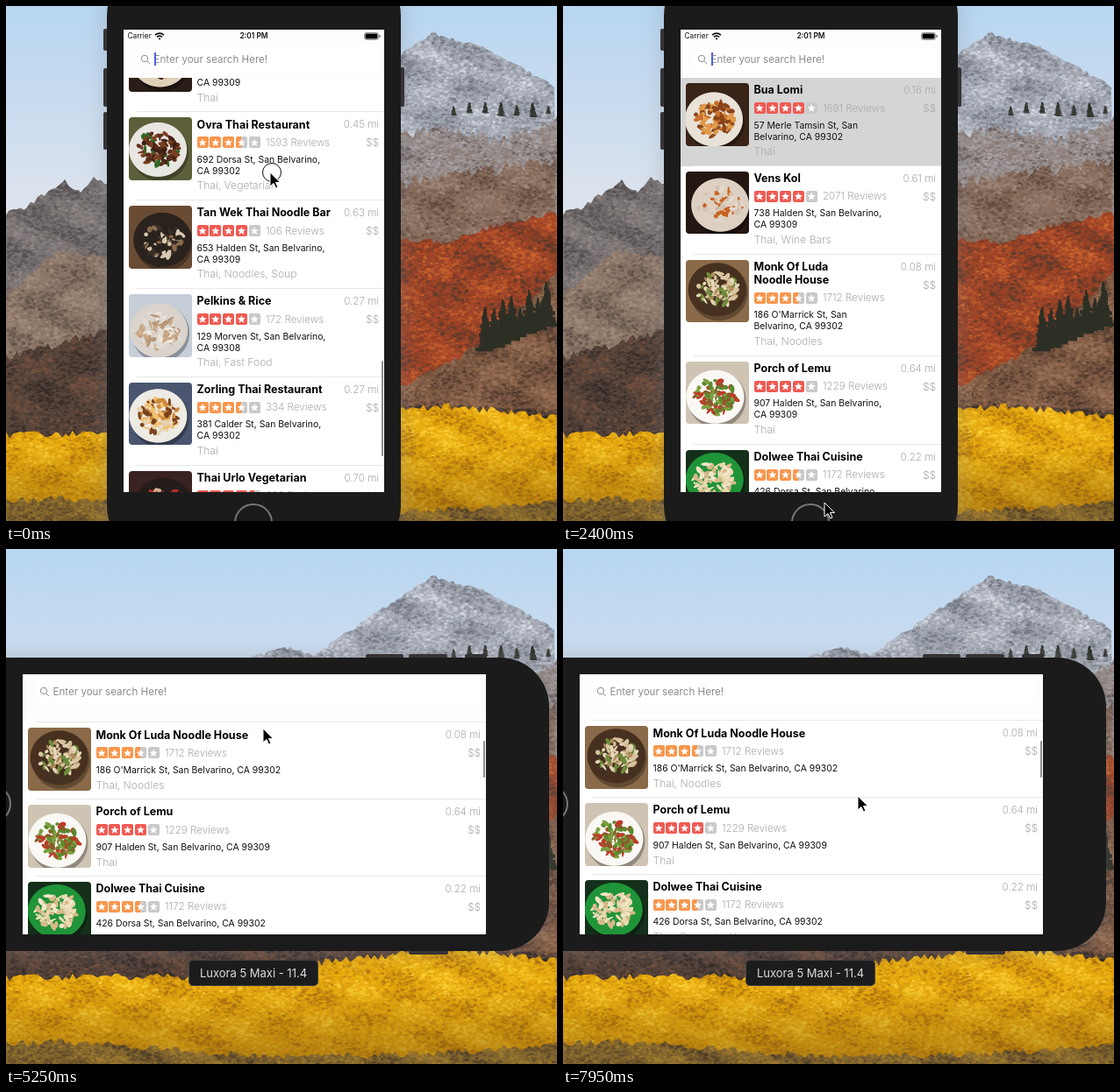
Write an HTML page with a canvas that moves like this. It is 628 by 588 pixels and loops after 8 s.

```html
<!DOCTYPE html>
<html lang="en">
<head>
<meta charset="utf-8">
<title>Restaurant list</title>
<style>
html, body { margin: 0; width: 100%; height: 100%; overflow: hidden; background: #c9dcf0; }
#stage { position: relative; width: 628px; height: 588px; overflow: hidden; font-family: Inter, Roboto, sans-serif; }
#stage div, #stage canvas, #stage svg { position: absolute; }
#device { left: 134px; top: 27px; width: 297px; height: 528px; }
#body { left: -19px; top: -72px; width: 335px; height: 672px; border-radius: 56px; background: #1b1b1b; box-shadow: 0 0 24px rgba(120,130,140,.35); }
.btn { width: 5px; background: #2b2627; border-radius: 2px; }
#home { left: 126px; top: 541px; width: 40px; height: 40px; border: 2px solid #777; border-radius: 50%; }
#shade { left: 5px; top: 528px; width: 292px; height: 23px; background: #0f0f0f; }
#screen { left: 0; top: 0; width: 297px; height: 528px; overflow: hidden; }
#view { left: 0; top: 0; }
#page { left: 0; top: 0; width: 100%; height: 100%; overflow: hidden; background: #fff; }
#list { left: 0; width: 100%; }
.row { left: 0; width: 100%; background: #fff; }
.row.on { background: #d5d5d5; }
.pic { left: 6px; top: 6px; width: 71.5px; height: 71.5px; border-radius: 4px; }
.row div { white-space: pre; }
.name { left: 83.5px; top: 6.2px; font: 700 12.5px/15.5px Inter, Roboto, sans-serif; color: #000; overflow: hidden; }
.grey { font-size: 11.6px; line-height: 16px; color: #aaa; font-weight: 300; }
.kinds { left: 83.5px; font-size: 12.1px; }
.addr { left: 83.5px; font-size: 10.4px; line-height: 13px; color: #111; }
.star { top: 0; width: 13px; height: 13px; border-radius: 2px; }
.star::after { content: ""; position: absolute; inset: 2px; background: #fff;
  clip-path: polygon(50% 0, 64% 34%, 100% 37%, 73% 60%, 82% 97%, 50% 77%, 18% 97%, 27% 60%, 0 37%, 36% 34%); }
.line { left: 15px; right: 0; bottom: 0; height: 1px; background: #e8e8ea; }
#head { left: 0; top: 0; width: 100%; background: #fdfdfd; }
#field { left: 14px; right: 6px; height: 26px; border-radius: 6px; background: #fff; }
#field svg { left: 5px; top: 7px; }
#hint { left: 20.5px; top: 5px; font-size: 11.6px; line-height: 16px; color: #8b8b8f; white-space: pre; }
#caret { left: 21px; top: 5px; width: 1.5px; height: 15px; background: #4a62d8; }
#status { left: 0; top: 0; width: 100%; height: 16px; font-size: 8.4px; line-height: 15px; color: #111; }
#bar { right: 1px; width: 2.5px; border-radius: 2px; background: #8c8c8c; }
#keys { left: 0; width: 100%; height: 150px; background: #cfd2d8; }
.key { width: 9%; height: 27px; background: #fff; border-radius: 4px; font-size: 14px; line-height: 27px; text-align: center; color: #111; box-shadow: 0 1px #999; }
#tag { left: 208px; top: 469px; width: 146px; height: 28px; border: 1px solid #444; border-radius: 5px; background: #1b1c1e; color: #ddd; font-size: 13px; line-height: 29px; text-align: center; white-space: pre; }
#ring { left: -9px; top: -11px; width: 20px; height: 20px; border: 1px solid #111; border-radius: 50%; }
#pointer { left: 0; top: 0; }
</style>
</head>
<body>
<div id="stage">
  <canvas id="wall" width="628" height="588"></canvas>
  <div id="device">
    <div id="body"></div>
    <div id="home"></div>
    <div id="shade"></div>
    <div id="screen"><div id="view">
      <div id="page">
        <div id="list"></div>
        <div id="bar"></div>
        <div id="head">
          <div id="field">
            <svg width="12" height="12" fill="none" stroke="#8b8b8f"><circle cx="5" cy="5" r="3.7"/><path d="M7.8 7.8 11 11"/></svg>
            <div id="hint">Enter your search Here!</div><div id="caret"></div>
          </div>
          <div id="status">
            <div style="left:4.5px">Carrier</div>
            <svg style="left:35px;top:3px" width="12" height="9" fill="none" stroke="#111" stroke-width="1.6"><path d="M1 3.2Q6-1 11 3.2M2.9 5.4Q6 2.8 9.1 5.4M5 7.4H7"/></svg>
            <div style="left:0;width:100%;text-align:center;font-weight:600">2:01 PM</div>
            <svg style="right:3px;top:3px" width="20" height="9"><rect x=".5" y=".5" width="16" height="8" rx="2" fill="none" stroke="#999"/><rect x="1.5" y="1.5" width="14" height="6" rx="1"/><path d="M18 3v3" stroke="#777" stroke-width="1.5"/></svg>
          </div>
        </div>
      </div>
      <div id="keys"></div>
    </div></div>
  </div>
  <div id="tag">Luxora 5 Maxi - 11.4</div>
  <div id="pointer">
    <div id="ring"></div>
    <svg style="left:-1px;top:-1px" width="15" height="21"><path transform="translate(1 1)" d="M0 0V16L4 12.5 6.5 18 9 17 6.5 11.5H11.5Z" stroke="#fff"/></svg>
  </div>
</div>
<script>
const $ = id => document.getElementById(id);
const mix = (a, b, p) => a + (b - a) * p;
const clamp = p => Math.max(0, Math.min(1, p));

let seed = 7;
const rnd = () => (seed = (seed * 16807) % 2147483647) / 2147483647;
const pick = list => list[Math.floor(rnd() * list.length)];

function add(parent, cls, text = "", style = {}) {
  const el = document.createElement("div");
  el.className = cls;
  el.textContent = text;
  Object.assign(el.style, style);
  parent.append(el);
  return el;
}

// ---------- wallpaper ----------
function paintWall() {
  const c = $("wall").getContext("2d");
  const W = 628, H = 588;
  const fade = (y0, y1, cols) => {
    const g = c.createLinearGradient(0, y0, 0, y1);
    cols.forEach((k, i) => g.addColorStop(i / (cols.length - 1), k));
    return g;
  };
  // Ground below a rough ridge line, grained from a dark-to-light palette
  const land = (ridge, rough, depth, tones, size = 2) => {
    const x0 = ridge[0][0], x1 = ridge[ridge.length - 1][0];
    const y0 = Math.min(...ridge.map(p => p[1]));
    c.save();
    c.beginPath();
    c.moveTo(x0, H);
    for (let i = 1; i < ridge.length; i++) {
      const [ax, ay] = ridge[i - 1], [bx, by] = ridge[i];
      for (let x = ax; x <= bx; x += 4) c.lineTo(x, mix(ay, by, (x - ax) / (bx - ax)) + (rnd() - .5) * rough);
    }
    c.lineTo(x1, H);
    c.clip();
    c.fillStyle = tones[tones.length >> 1];
    c.fillRect(x0, y0 - rough, x1 - x0, H);
    const n = (x1 - x0) * (depth + rough) / (size * size);
    for (let i = 0; i < n; i++) {
      const x = mix(x0, x1, rnd()), y = y0 - rough + (depth + rough) * rnd();
      const wave = Math.sin(x * .07 + 2 * Math.sin(y * .06)) + Math.sin(y * .13 - x * .05);
      const k = clamp(.5 + wave * .16 + (rnd() - .5) * .75);
      c.globalAlpha = .35 + rnd() * .4;
      c.fillStyle = tones[Math.min(tones.length - 1, Math.floor(k * tones.length))];
      const s = size * (.5 + rnd());
      c.fillRect(x, y, s * 1.6, s);
    }
    c.restore();
  };
  c.fillStyle = fade(0, 240, ["#b7d6f1", "#cbdcef", "#dfe4ec"]);
  c.fillRect(0, 0, W, H);

  land([[270,126], [320,113], [350,122], [430,68], [485,31], [545,47], [628,94]], 5, 130, ["#6d727e", "#8b909b", "#a3a8b2", "#bcc2cd", "#d8dde6"]);
  land([[440,150], [500,138], [560,155], [628,130]], 14, 150, ["#5f5352", "#857976", "#98908f", "#b2adb1", "#8a7468"]);
  land([[440,205], [530,190], [628,180]], 16, 90, ["#5c463c", "#77604f", "#8c7161", "#a08b80"]);
  land([[440,264], [500,270], [560,250], [628,236]], 8, 200, ["#4f3a2e", "#7c3a26", "#9c4428", "#b9502a", "#cf6a30"]);
  land([[440,440], [520,400], [560,372], [628,305]], 8, 190, ["#4c372c", "#6b4d3b", "#855f48", "#a0785c"]);
  land([[0,236], [20,231], [67,200], [85,214], [100,196], [300,290]], 5, 180, ["#524d50", "#686264", "#7b7474", "#968e8b"]);
  land([[0,330], [60,280], [300,300]], 8, 170, ["#5b4d45", "#7a685c", "#8f7a6b", "#a8917f"]);
  land([[0,402], [115,370], [330,420], [440,455], [628,462]], 10, 140, ["#2f2826", "#443732", "#5b473c", "#7c5540"]);
  land([[0,490], [220,488], [440,464], [500,456], [628,470]], 9, 132, ["#a86f12", "#cf920f", "#e6a90f", "#f2bb17", "#fbd23a"]);
  // The lower half of the foliage is darker
  c.fillStyle = fade(500, H, ["rgba(120,75,10,0)", "rgba(110,70,20,.45)"]);
  c.fillRect(0, 500, W, 88);
  land([[0,566], [60,562], [300,580], [480,577], [628,566]], 8, 30, ["#4d3c28", "#6b532c", "#86692f", "#a8822f"]);

  const tree = (x, y, h) => {
    c.fillStyle = "#2d2f25";
    for (let k = 0; k < 1; k += .07) {
      const w = h * .2 * (1 - k) + 1;
      c.fillRect(x - w * (.6 + rnd() * .6), y - h * k - h / 12, w * 2, h / 11);
    }
  };
  for (let i = 0; i < 8; i++) tree(546 + i * 10, 394 - i * 4, 30 + rnd() * 22);
  for (let i = 0; i < 7; i++) tree(510 + i * 18, 122 + rnd() * 6, 8 + rnd() * 9);
}

// ---------- dish pictures: table, plate, then food colours ----------
function dish(canvas, colours) {
  const [table, plate, ...food] = colours.split(" ").map(k => "#" + k);
  const c = canvas.getContext("2d");
  c.scale(2, 2);
  const oval = (col, x, y, a, b, turn) => {
    c.fillStyle = col;
    c.beginPath();
    c.ellipse(x, y, a, b, turn, 0, 7);
    c.fill();
  };
  c.fillStyle = table;
  c.fillRect(0, 0, 72, 72);
  const x = 32 + rnd() * 8, y = 34 + rnd() * 8, r = 33;
  oval("rgba(0,0,0,.3)", x + 2, y + 3, r, r, 0);
  oval(plate, x, y, r, r * .94, 0);
  for (let i = 0; i < 90; i++) {
    const a = rnd() * 7, d = Math.sqrt(rnd()) * r * .7;
    oval(pick(food), x + Math.cos(a) * d, y + Math.sin(a) * d * .85, 2 + rnd() * 4, 1 + rnd() * 2, rnd() * 3);
  }
}

// name, stars, reviews, address, kinds, miles, colours; "|" breaks the line on the narrow layout
const CITY = ", San Belvarino,|CA 99", WRAP = ", San|Belvarino, CA 99";
const rows = [
  ["Bua Lomi", 4, 1691, "57 Merle Tamsin St" + WRAP + "302", "Thai", "0.16", "3a2418 e8e2d8 c9702a e09a4a 8a4418"],
  ["Vens Kol", 4, 2071, "738 Halden St" + CITY + "309", "Thai, Wine Bars", "0.61", "241712 ddd0c2 ddd0c2 e4d9cc c8601f d2c2b2"],
  ["Monk Of Luda|Noodle House", 3.5, 1712, "186 O'Marrick St" + WRAP + "302", "Thai, Noodles", "0.08", "8a6a48 46301f d8c4a0 e6d6b8 6e8a3a b08a5c"],
  ["Porch of Lemu", 4, 1229, "907 Halden St" + CITY + "309", "Thai", "0.64", "cfc4b4 faf8f4 5a8a2e c03a28 8a5a2a 7aa040"],
  ["Dolwee Thai Cuisine", 3.5, 1172, "426 Dorsa St" + CITY + "302", "Thai, Desserts, Vegan", "0.22", "14301a 1f9438 ead9b0 d8b98a f2e6c8"],
  ["Corlo Thai Restaurant|& Bar", 4, 1413, "1178 Wexham St" + WRAP + "303", "Thai, Bars", "0.74", "e6dccf b98a52 f4efe6 ffffff e0d5c5"],
  ["Olm Thai Cafe", 4.5, 355, "1337 Pell St" + CITY + "309", "Thai", "0.80", "b4bcc0 2b2725 b02a22 2b2725 3a3432 8a1c18"],
  ["Narvo Thai Kitchen", 4, 418, "512 Calder St" + CITY + "302", "Thai", "0.33", "6a4a34 efe8dc c98a3a 6a8a3a a8502a"],
  ["Bolunara Eatery", 4.5, 113, "694 Fenn St" + CITY + "309", "Breakfast & Brunch, Burgers, Thai", "0.38", "a07a4c e9dfd0 222222 3b3430 d08a3a e9dfd0"],
  ["Moi Dul Thai Restaurant", 4, 850, "775 O'Marrick St" + WRAP + "309", "Thai, Desserts, Seafood", "0.59", "4a3526 6b5646 f0ebe0 7a4a2a c8beb0 3a2a20"],
  ["Garvon Thai Restaurant", 4, 265, "628 O'Marrick St" + WRAP + "309", "Laotian, Thai, Desserts", "0.47", "3a2c24 c9c6c0 8a3a22 4a6a2a b5763a 4a2c20"],
  ["The Dun Vale|Thai Restaurant", 3.5, 531, "207 Orlin St" + CITY + "302", "Thai", "0.18", "b8976a efe2cc b5722e 8a4f1e d09850"],
  ["Quillorn Hall", 4, 322, "1264 Brill Ave" + WRAP + "333", "Thai, Noodles", "0.88", "7ab0b8 eef0ee b02a2a 6aa03a d8a070"],
  ["Pim Tavo Thai", 4, 640, "833 Halden St" + CITY + "309", "Thai", "0.52", "2a1c16 e0d2b8 9a5a2a d0a050 4a2c18"],
  ["Ovra Thai Restaurant", 3.5, 1593, "692 Dorsa St" + CITY + "302", "Thai, Vegetarian", "0.45", "5d5f3a e8e6e0 5a2c1a 7a3e22 2f6a28 3f2014"],
  ["Tan Wek Thai Noodle Bar", 4, 106, "653 Halden St" + CITY + "309", "Thai, Noodles, Soup", "0.63", "6a4c34 2a221d d8c8b0 3a2f28 8a6a4c 2a221d"],
  ["Pelkins & Rice", 4, 172, "129 Morven St" + CITY + "308", "Thai, Fast Food", "0.27", "c6ced8 d9d3cc b8987a f2ece0 c9a888 e2ddd6"],
  ["Zorling Thai Restaurant", 3.5, 334, "381 Calder St" + CITY + "302", "Thai", "0.27", "4a5670 eeeae4 d08a3a f0c070 7a421e e6d2b0"],
  ["Thai Urlo Vegetarian", 4.5, 660, "717 Pell St" + CITY + "309", "Thai, Vegetarian", "0.70", "3a2220 241c1a b03028 7a2a24 d0b090"],
  ["Sela Dorn Thai", 4, 287, "340 Wexham St" + CITY + "303", "Thai", "0.91", "5a4030 ece4d8 b5762e 6a8a3a"],
].map(makeRow);

function makeRow([name, stars, count, addr, kinds, miles, colours], i) {
  const el = add($("list"), i ? "row" : "row on");
  const pic = document.createElement("canvas");
  pic.className = "pic";
  pic.width = pic.height = 144;
  dish(pic, colours);
  el.append(pic);
  const row = { el, name, addr, wide: name.includes("|") };
  row.title = add(el, "name");
  row.rating = add(el, "", "", { left: "83.5px" });
  const col = stars < 4 ? "#f9964c" : "#ef5a52";
  for (let s = 0; s < 5; s++) {
    const part = clamp(stars - s) * 100;
    add(row.rating, "star", "", { left: s * 14.8 + "px", background: `linear-gradient(90deg, ${col} ${part}%, #c9c9c9 ${part}%)` });
  }
  add(row.rating, "grey", count + " Reviews", { left: "78.5px", top: "-1.5px" });
  row.place = add(el, "addr");
  row.kinds = add(el, "grey kinds", kinds);
  add(el, "grey", miles + " mi", { right: "6px", top: "6px" });
  add(el, "grey", "$$", { right: "6px", top: "27px" });
  add(el, "line");
  return row;
}

["QWERTYUIOP", "ASDFGHJKL", "ZXCVBNM"].forEach((keys, r) => {
  [...keys].forEach((k, i) => add($("keys"), "key", k, { left: (i + r * (r + 1) / 4) * 10 + .5 + "%", top: 3 + r * 33 + "px" }));
});

function addButton(x, y, h) {
  $("device").prepend(add($("device"), "btn", "", { left: x + "px", top: y + "px", height: h + "px" }));
}
addButton(-23, -1, 25);
addButton(-23, 44, 44);
addButton(-23, 94, 43);
addButton(315, 43, 45);

// ---------- motion ----------
const STEP = 150, LOOP = 8000;
const linear = p => p;
const out = p => 1 - (1 - p) ** 2;
const inOut = p => p < .5 ? 2 * p * p : 1 - 2 * (1 - p) ** 2;
const span = (t, t0, t1) => inOut(clamp((t - t0) / (t1 - t0)));

// time, offset, easing on the way there
const scrolls = [[0, 1418], [750, 958, out], [900, 841, linear], [1918, 0, out], [4200, 0], [4950, 166, inOut],
  [5550, 166], [6300, 518, inOut], [6450, 518], [6900, 331, linear], [7950, 168, out]];
// time, x, y, pressed on the way there
const pointer = [[0, 301, 190], [300, 301, 500, true], [750, 299, 333], [1050, 298, 567, true], [3450, 298, 567],
  [4050, 293, 371], [5000, 293, 205, true], [5250, 293, 205, true], [5550, 298, 380], [6000, 306, 160, true],
  [6450, 312, 250], [6900, 322, 437, true], [7350, 336, 282], [LOOP, 336, 282]];

function leg(keys, t) {
  const i = keys.findIndex(k => k[0] > t);
  const b = keys[i < 0 ? keys.length - 1 : i], a = i < 0 ? b : keys[i - 1];
  return { a, b, p: a === b ? 1 : (t - a[0]) / (b[0] - a[0]) };
}

function scrollAt(t) {
  const { a, b, p } = leg(scrolls, t);
  return mix(a[1], b[1], (b[2] || linear)(p));
}

const show = (el, on) => el.style.visibility = on ? "visible" : "hidden";
let tall = null;

function setLayout(portrait) {
  if (tall === portrait) return;
  tall = portrait;
  const gap = portrait ? "\n" : " ";
  for (const r of rows) {
    r.title.textContent = r.name.replace("|", gap);
    r.place.textContent = r.addr.replace("|", gap);
    const extra = portrait && r.wide ? 15.4 : 0;
    r.rating.style.top = 28 + extra + "px";
    r.place.style.top = 47.5 + extra + "px";
  }
}

function drawList(p, turning) {
  let y = 0;
  for (const r of rows) {
    const extra = r.wide ? 15.4 : 0;
    const h = mix(100.8 + extra, 87.7, p);
    r.el.style.top = y + "px";
    r.el.style.height = h + "px";
    r.kinds.style.top = mix(76 + extra, 63.5, p) + "px";
    r.title.style.width = r.wide && turning ? mix(88, 168, p) + "px" : "auto";
    y += h;
  }
}

function drawPointer(t) {
  const { a, b, p } = leg(pointer, t);
  const k = b[3] ? p : inOut(p);
  $("pointer").style.transform = `translate(${mix(a[1], b[1], k)}px, ${mix(a[2], b[2], k)}px)`;
  show($("ring"), b[3]);
}

function draw(t) {
  const turn = span(t, 2400, 3000), p = span(t, 2890, 3490), off = scrollAt(t);
  const turning = p > 0 && p < 1;
  const w = mix(297, 528, p), h = mix(528, 297, p), top = mix(55, 46, p);
  $("device").style.transform = `translate(${turn / 2}px, ${turn / 2}px) rotate(${turn * 90}deg)`;
  $("screen").style.background = turning ? "#000" : "#fff";
  Object.assign($("view").style, {
    width: w + "px", height: h + "px",
    transform: `translate(${(297 - w) / 2}px, ${(528 - h) / 2}px) rotate(${-90 * p}deg)`
  });
  setLayout(p === 0);
  drawList(p, turning);
  $("list").style.top = top - off + "px";
  $("head").style.height = top + "px";
  $("field").style.top = mix(21, 7, p) + "px";
  $("status").style.opacity = clamp(2 - 2 * p);
  show($("caret"), p === 0);
  $("bar").style.top = top + 2 + off * mix(.2265, .166, p) + "px";
  $("bar").style.height = mix(109, 42, p) + "px";
  show($("bar"), t < 2250 || t > 4200);
  $("keys").style.top = h + "px";
  show($("keys"), turning);
  show($("shade"), t >= 1200 && t < 2250);
  show($("tag"), t >= 3000);
  drawPointer(t);
}

paintWall();
const start = performance.now();
let last = -1;
function tick() {
  const t = Math.floor((performance.now() - start) % LOOP / STEP) * STEP;
  if (t !== last) draw(last = t);
  requestAnimationFrame(tick);
}
tick();
</script>
</body>
</html>
```
